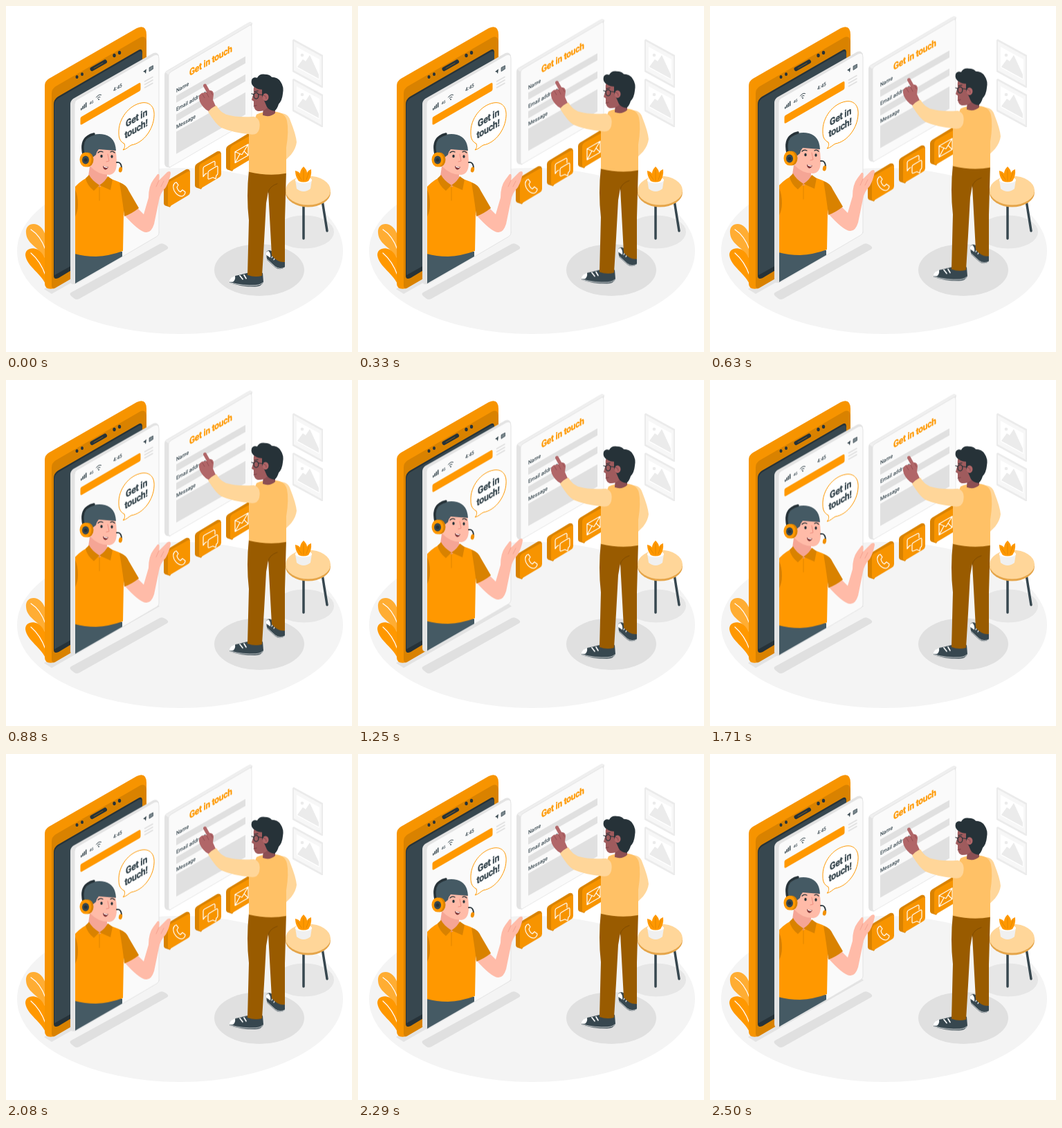
Write an HTML page that moves like this. It is 500 by 500 pixels and loops after 2540 ms.

```html
<!DOCTYPE html>
<html lang="en">
<head>
<meta charset="utf-8">
<title>Get in touch</title>
<style>
  html, body { margin: 0; width: 100%; height: 100%; overflow: hidden; background: #fff; }
  svg { display: block; width: 100vw; height: 100vh; }
  text { font-family: Roboto, Arial, sans-serif; fill: #37474f; }
  .bold { font-weight: 700; letter-spacing: -.25px; stroke: #37474f; stroke-width: .3; }
  .title { fill: #ff9800; stroke: #ff9800; }
  .label { font-size: 7.9px; font-weight: 500; }
  .line { fill: none; stroke-linecap: round; stroke-linejoin: round; }
</style>
</head>
<body>
<svg viewBox="0 0 500 500" xmlns="http://www.w3.org/2000/svg">
  <defs>
    <clipPath id="face"><path d="M100 142Q100 137 104 135L214 71Q220 68 220 76V332L100 401Z"/></clipPath>
    <g id="button">
      <path fill="#d98200" d="M228 259Q228 256 231 254L259 237Q262 235 265 237L266 240 237 291 231 289Q228 288 228 285Z"/>
      <path fill="#f79400" d="M234 260Q234 256 237 254L262 240Q266 238 266 242V269Q266 272 263 274L238 289Q234 291 234 287Z"/>
    </g>
    <g id="picture">
      <path fill="#ebebeb" d="M414 49 416 48 458 71V118L456 118 414 95Z"/>
      <path fill="#f7f7f7" d="M416 51 456 73V115L416 93Z"/>
      <path fill="#fff" d="M420 59 453 77V107L420 89Z"/>
      <path fill="#ebebeb" d="M421 88 429 77 433 80 439 71 452 99V105Z"/>
      <circle cx="428" cy="71" r="2.3" fill="#ebebeb"/>
    </g>
  </defs>

  <!-- floor and shadows -->
  <ellipse cx="251.500" cy="354" rx="235.500" ry="120" fill="#f4f4f4"/>
  <ellipse cx="431" cy="326.500" rx="43" ry="24" fill="#e6e6e6"/>
  <ellipse cx="366" cy="381.500" rx="65" ry="37.500" fill="#e0e0e0"/>
  <path fill="#e3e3e3" d="M55 409 66 416 222 327 212 319Z"/>
  <path fill="#e0e0e0" d="M94 414 222 344Q226 342 230 345L233 347Q236 350 232 352L106 423Q102 425 99 423L94 419Q91 416 94 414Z"/>

  <use href="#picture"/>
  <use href="#picture" y="57"/>

  <!-- plant -->
  <path fill="#ffad33" d="M58 368C52 350 30 346 29 328C28 317 37 313 45 316C54 320 57 330 58 336Z"/>
  <path fill="#ff9800" d="M59 406C52 386 30 377 28 360C28 351 37 348 46 352C54 357 58 366 59 374Z"/>
  <path class="line" stroke="#fff" stroke-width="1.200" d="M36 323Q50 332 57 352M36 357Q50 369 57 389"/>

  <!-- phone -->
  <path fill="#f79400" d="M56 115Q56 109 62 105L189 32Q203 26 203 42V330L70 408Q56 411 56 401Z"/>
  <path fill="#d98200" d="M66 126Q66 120 72 116L193 46Q203 41 203 54V331L70 408Q66 409 66 404Z"/>
  <path fill="#263238" d="M69 142Q69 135 75 131L191 64Q197 60 197 68V320L76 393Q69 396 69 390Z"/>
  <path fill="#37474f" d="M70 143Q70 137 76 133L192 66Q197 64 197 70V318L70 389Z"/>
  <path class="line" stroke="#263238" stroke-width="6" d="M124.500 91 143 80.500"/>
  <path class="line" stroke="#7a5a22" d="M127 90 140 82.500"/>
  <g fill="#263238">
    <ellipse cx="102.500" cy="102.500" rx="2" ry="2.500"/><ellipse cx="110" cy="98.500" rx="2" ry="2.500"/>
    <ellipse cx="156.500" cy="71.500" rx="2.200" ry="2.700"/><ellipse cx="164" cy="67.500" rx="2.200" ry="2.700"/>
  </g>

  <!-- table -->
  <path class="line" stroke="#37474f" stroke-width="3.500" d="M430 287V336M457 281 464 325"/>
  <ellipse cx="436.500" cy="269.500" rx="32.500" ry="21" fill="#e5a54a"/>
  <ellipse cx="436.500" cy="266.500" rx="32.500" ry="21" fill="#ffd699"/>
  <path fill="#f0f0f0" d="M418 251 420 264Q430 272 440 264L442 251Z"/>
  <ellipse cx="430" cy="251.500" rx="12" ry="4.500" fill="#fff"/>
  <path fill="#ff9800" d="M423 253C419 247 418 243 418 238Q423 239 425 242Q425 237 430 232Q435 237 435 241Q437 237 441 236Q442 246 437 253Q430 256 423 253Z"/>
  <path class="line" stroke="#d98200" stroke-width=".7" d="M430 237V252M421 242 427 251M438 240 434 251"/>

  <!-- form, buttons and visitor -->
  <g id="visitor">
    <path fill="#e3e3e3" d="M229 100Q229 96 232 94L349 25Q353 22 356 25L355 30 237 234 232 233Q229 231 229 227Z"/>
    <path fill="#efefef" d="M230 96 349 25Q353 22 356 25L353 28 240 94Q236 96 235 100Z"/>
    <path fill="#fafafa" stroke="#e3e3e3" stroke-width=".8" d="M235 101Q235 97 239 95L351 29Q355 26 355 32V160Q355 164 352 166L239 232Q235 235 235 230Z"/>
    <g fill="#e0e0e0">
      <path d="M246 130 346 73V83L246 140Z"/>
      <path d="M246 157 346 99V109L246 167Z"/>
      <path d="M246 182 346 125V157L246 214Z"/>
    </g>
    <text class="bold title" font-size="13.700" transform="matrix(.866 -.5 0 1 265 101.500)">Get in touch</text>
    <text class="label" transform="matrix(.866 -.5 0 1 246 125.500)">Name</text>
    <text class="label" transform="matrix(.866 -.5 0 1 246 152.500)">Email address</text>
    <text class="label" transform="matrix(.866 -.5 0 1 246 178)">Message</text>

    <use href="#button"/>
    <use href="#button" x="45" y="-26"/>
    <use href="#button" x="90" y="-52"/>
    <g class="line" stroke="#fff" stroke-width="1.200">
      <path d="M244 256Q240 260 243 267Q248 276 255 275Q259 273 259 269L255 266 252 269Q248 267 247 262L249 259 246 255Z"/>
      <path d="M290 242 288 243 285 247V235Q285 233 287 232L300 225Q302 224 302 226V231M294 238 304 232Q306 231 306 233V242Q306 244 304 245L303 250 299 248 294 250Q292 251 292 249V241Q292 239 294 238"/>
      <path d="M331 211 350 200V216L331 227ZM331 211 341 215 350 200M331 227 338 214M350 216 344 210"/>
    </g>

    <!-- shoes -->
    <path fill="#37474f" d="M376 356Q379 351 385 355L392 366 403 370V378Q396 383 389 378L377 367Z"/>
    <path fill="#fff" d="M376 356 379 354Q383 357 382 364L376 360Z"/>
    <path class="line" stroke="#fff" stroke-width=".8" d="M376 365 389 377Q396 382 403 378"/>
    <path class="line" stroke="#fff" stroke-width="1.300" d="M384 364 387 359M387 367 390 362"/>
    <path fill="#37474f" d="M323 397Q326 390 337 389L349 386H371L372 399Q370 405 360 406Q339 406 323 400Z"/>
    <path class="line" stroke="#fff" stroke-width="1.700" d="M338 390 342 395M344 389 347 394"/>
    <path fill="#fff" d="M323 396Q325 392 331 390Q332 396 328 399L323 399Z"/>
    <path class="line" stroke="#fff" stroke-width=".8" d="M324 400Q343 405 361 404Q369 403 371 400"/>

    <!-- trousers -->
    <path fill="#995b00" d="M351 238H405L403 310 403 370Q394 372 384 361L379 268 376 285 373 340 370 390Q360 393 349 389L351 310Q347 275 351 238Z"/>
    <path class="line" stroke="#7f4b00" d="M379 270Q380 261 392 257"/>

    <!-- torso and arms -->
    <path fill="#ffd699" d="M395 155Q408 155 411 166Q419 186 420 197Q419 206 412 215L404 223 398 190Z"/>
    <path fill="#ffc166" d="M362 157Q373 152 389 153Q403 154 406 166Q409 180 405 205L405 242Q380 247 351 240L351 185Z"/>
    <path fill="#b16668" d="M289 150Q280 142 279 134Q278 129 283 126L290 125 285 116Q285 112 289 113L294 122Q300 122 300 128L299 136 303 145 296 154Z"/>
    <path class="line" stroke="#8f4b50" stroke-width=".8" d="M290 126 293 132M284 128 287 133M296 124 298 128"/>
    <path fill="#ffd699" d="M304 144Q309 153 318 157Q335 162 358 160Q369 163 366 178Q364 186 356 186Q329 184 311 176Q303 171 292 153Q297 147 304 144Z"/>

    <!-- head -->
    <path fill="#8c4f53" d="M372 144H389V155Q381 162 371 158Z"/>
    <path fill="#9f5b5d" d="M360 112Q357 119 358 125L355 136 358 138Q357 150 363 152Q372 153 377 148L386 136 380 112Z"/>
    <path fill="#263238" d="M360 118Q353 114 355 107Q357 102 363 104Q366 98 374 99Q381 99 384 103Q393 103 397 110Q402 117 400 127Q399 137 394 142Q392 149 388 152Q380 151 377 146L374 139 370 131V121Q364 121 360 118Z"/>
    <ellipse cx="375" cy="132" rx="4.500" ry="5.500" fill="#b16668"/>
    <path class="line" stroke="#7c4248" stroke-width=".8" d="M373 130Q376 129 376 134"/>
    <g class="line" stroke="#263238" stroke-width="1.200">
      <ellipse cx="361.500" cy="130" rx="3.400" ry="4.300"/>
      <path d="M365 128 372 129M355 127 358 128M359 124 364 123"/>
    </g>
    <path class="line" stroke="#6d393e" stroke-width=".8" d="M358 145 362 144"/>
  </g>

  <!-- screen and agent -->
  <g id="agent">
    <path fill="#e3e3e3" d="M93 142Q93 137 97 134L213 68Q219 66 221 72L220 78 101 402 96 402Q93 401 93 397Z"/>
    <path fill="#fafafa" stroke="#e3e3e3" d="M99 142Q99 137 103 135L214 71Q221 68 221 76V328Q221 331 218 333L104 400Q99 402 99 397Z"/>

    <g fill="#37474f">
      <path d="M108 148 109.500 147V150L108 151ZM110.300 145 111.800 144V148.700L110.300 149.600ZM112.600 142.500 114.100 141.500V147.500L112.600 148.300ZM114.900 140 116.400 139V146L114.900 147Z"/>
      <path d="M198 95 203 91 202 98 200.500 95.500Z"/>
      <path d="M207 89 212.500 86V91L207 94.500Z" stroke="#37474f" stroke-width=".7" fill="#78868c"/>
      <circle cx="134" cy="135" r=".9"/>
    </g>
    <path class="line" stroke="#37474f" d="M132 133.500Q134 130.500 136 131.500M130.500 132Q134 127 137.500 128.500"/>
    <text font-size="5.500" font-weight="500" transform="matrix(.866 -.5 0 1 120.500 143)">4G</text>
    <text font-size="7.500" font-weight="500" transform="matrix(.866 -.5 0 1 155 124)">4:45</text>
    <path class="line" stroke="#e0e0e0" stroke-width="1.600" d="M200.500 109 212 102.500M200.500 113.500 212 107M200.500 118 212 111.500"/>
    <path fill="#ff9800" d="M107.500 163Q107.500 161 109 160L192 111.500Q194.500 110 194.500 113V120Q194.500 122 193 123L110 171Q107.500 172.500 107.500 170Z"/>

    <path fill="#fff" stroke="#ff9800" d="M169 208C172 205 172 202 171 199C165 196 163 191 163 184C162 163 178 143 196 140C207 138 215 145 214 159C213 178 199 198 181 201C177 203 174 207 169 208Z"/>
    <g class="bold" font-size="14.200">
      <text transform="matrix(.866 -.5 0 1 173 175.500)">Get in</text>
      <text transform="matrix(.866 -.5 0 1 171.500 192)">touch!</text>
    </g>

    <g clip-path="url(#face)">
      <path fill="#455a64" d="M99 355H168V370L99 410Z"/>
      <path fill="#ff9800" d="M99 262Q109 251 122 246L148 249Q163 253 171 259L170 300 169 354Q150 361 130 362Q112 362 99 358Z"/>
      <path fill="#d98200" d="M99 264Q104 272 104 287Q104 298 99 306Z"/>
    </g>

    <!-- raised arm -->
    <path fill="#ffbba8" d="M170 301 189 291 199 301 206 277Q206 260 213 251L219 243Q223 241 221 252L233 240Q238 237 238 242Q236 253 231 262Q223 270 221 281L214 315Q210 328 202 327Q192 326 170 301Z"/>
    <path class="line" stroke="#f29c8c" stroke-width=".8" d="M221 252 217 261M228 253 224 261"/>
    <path fill="#d98200" d="M164 255Q174 258 178 268L192 292Q182 300 171 304Q169 285 164 255Z"/>

    <!-- neck and collar -->
    <path fill="#f5a595" d="M121 232H146V249Q141 258 135 262Q124 253 119 246Z"/>
    <path fill="#d98200" d="M120 244Q124 252 135 259L127 267Q117 259 115 249ZM147 246 154 251 151 266 135 259Q144 253 147 246Z"/>
    <path class="line" stroke="#d98200" stroke-width=".8" d="M135 260V281"/>

    <!-- head and headset -->
    <path fill="#ffbba8" d="M122 204Q139 194 157 203Q160 215 160 226Q160 243 149 244Q133 244 122 232Z"/>
    <path fill="#455a64" d="M112 216Q109 198 119 190Q129 183 143 186Q158 190 159 209Q146 208 134 207Q131 210 130 215L125 219 122 231Q114 228 112 216Z"/>
    <path class="line" stroke="#263238" stroke-width="3.500" d="M112 214Q108 196 118 189Q122 186 127 185"/>
    <ellipse cx="118" cy="222" rx="8.500" ry="10.500" fill="#d98200"/>
    <ellipse cx="115" cy="222" rx="8.500" ry="10.500" fill="#ff9800"/>
    <ellipse cx="115" cy="222.500" rx="5" ry="6" fill="#37474f"/>
    <circle cx="115" cy="222.500" r="2.500" fill="#263238"/>
    <path class="line" stroke="#263238" stroke-width="1.800" d="M160 226Q167 225 167 235"/>
    <ellipse cx="165.500" cy="236.500" rx="2.500" ry="4" fill="#f29000" transform="rotate(15 165.500 236.500)"/>
    <g fill="#263238">
      <ellipse cx="138" cy="217" rx="1.700" ry="2.200"/><ellipse cx="153" cy="217.500" rx="1.600" ry="2.200"/>
    </g>
    <path class="line" stroke="#263238" stroke-width="1.300" d="M133 212Q136 209 140 211M151 211Q154 209 157 212"/>
    <path class="line" stroke="#ef8f80" d="M147 214 149 224 145 225"/>
    <path fill="#7d3436" d="M140 231Q144 233 148 232.500Q146 237 143 236.500Q140 235 140 231Z"/>
    <path fill="#fff" d="M140.500 231.300Q144 233 147.500 232.700L146 234Q142 234 140.500 231.300Z"/>
  </g>
</svg>
<script>
  const LOOP = 2540, FPS = 24, FRAMES = 61;
  const PERIOD = 1500, LIFT = 10, LEAD = 20;

  // Linear rise and fall, resting until the delay has passed.
  const lift = (ms) => {
    if (ms < 0) return 0;
    const p = (ms % PERIOD) / PERIOD;
    return LIFT * (1 - Math.abs(1 - 2 * p));
  };

  const float = (id, delay) => {
    const steps = Array.from({ length: FRAMES }, (_, i) => {
      const ms = Math.round(i * 100 / FPS) * 10;
      return {
        offset: ms / LOOP,
        transform: `translateY(${-lift(ms + LEAD - delay).toFixed(2)}px)`,
        easing: 'step-end'
      };
    });
    steps.push({ ...steps[FRAMES - 1], offset: 1 });
    const motion = document.getElementById(id).animate(steps, { duration: LOOP, iterations: Infinity });
    motion.startTime = 0;
  };

  float('visitor', 0);
  float('agent', 500);
</script>
</body>
</html>
```
